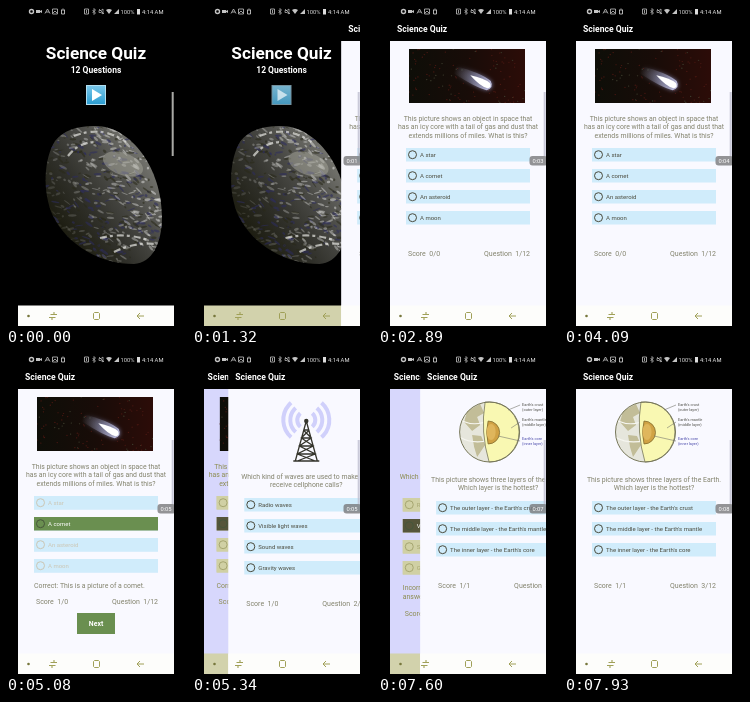
Recreate the animation shown at these times as an HTML page with a canvas. Size 180x320 px, loop 8 s.

```html
<!DOCTYPE html>
<html lang="en">
<head>
<meta charset="utf-8">
<title>Science Quiz</title>
<style>
html, body { margin: 0; width: 100%; height: 100%; overflow: hidden; background: #000; }
canvas { display: block; width: 180px; height: 320px; }
</style>
</head>
<body>
<canvas id="stage"></canvas>
<script>
const LOOP = 8000, LEFT = 12, WIDTH = 156, SLIDE = 500;
const SLIDE_STARTS = [1300, 5110, 7390];
const TICKS = [950, 1970, 2890, 3950, 4900, 5990, 6990, 7930];
const LIGHT = { bg: '#f9f9ff', box: '#d0ecfb', text: '#82826c', option: '#4a4a3c', faded: '#cbc6b4', pick: '#6a8f50', nav: '#fdfdfb' };
const DIM = { bg: '#d7d7fc', box: '#d0d0a4', text: '#8c8c50', option: '#77773f', faded: '#a6a670', pick: '#55553a', nav: '#d2d2ac' };

const QUESTIONS = [
  { art: drawComet, textY: 115, top: 142, pick: 1, pickAt: 4130, score: ['0/0', '1/0'],
    text: ['This picture shows an object in space that', 'has an icy core with a tail of gas and dust that', 'extends millions of miles. What is this?'],
    options: ['A star', 'A comet', 'An asteroid', 'A moon'],
    note: ['Correct: This is a picture of a comet.'] },
  { art: drawTower, textY: 125, top: 144, pick: 1, pickAt: 6570, score: ['1/0', '1/1'],
    text: ['Which kind of waves are used to make and', 'receive cellphone calls?'],
    options: ['Radio waves', 'Visible light waves', 'Sound waves', 'Gravity waves'],
    note: ['Incorrect: Radio waves is the correct', 'answer.'] },
  { art: drawLayers, textY: 128, top: 147, pick: -1, pickAt: Infinity, score: ['1/1'],
    text: ['This picture shows three layers of the Earth.', 'Which layer is the hottest?'],
    options: ["The outer layer - the Earth's crust", "The middle layer - the Earth's mantle", "The inner layer - the Earth's core"] }
];

const canvas = document.getElementById('stage');
const g = canvas.getContext('2d');
const dpr = window.devicePixelRatio || 1;
canvas.width = 180 * dpr;
canvas.height = 320 * dpr;

const clamp = v => Math.max(0, Math.min(1, v));

function seeded(seed) {
  return () => (seed = (seed * 16807) % 2147483647) / 2147483647;
}

function rect(x, y, w, h, color) {
  g.fillStyle = color;
  g.fillRect(x, y, w, h);
}

function label(text, x, y, size, color, align = 'left', weight = 400) {
  g.font = `${weight} ${size}px Roboto, sans-serif`;
  g.textAlign = align;
  g.fillStyle = color;
  g.fillText(text, x, y);
}

function ellipse(x, y, rx, ry, color, angle = 0) {
  g.beginPath();
  g.ellipse(x, y, rx, ry, angle, 0, 7);
  g.fillStyle = color;
  g.fill();
}

function ring(x, y, r, color, width = 1, from = 0, to = 7) {
  g.beginPath();
  g.arc(x, y, r, from, to);
  g.strokeStyle = color;
  g.lineWidth = width;
  g.stroke();
}

function shape(d, fill, stroke, width = 1) {
  const path = new Path2D(d);
  if (fill) { g.fillStyle = fill; g.fill(path); }
  if (stroke) { g.strokeStyle = stroke; g.lineWidth = width; g.stroke(path); }
}

function clipped(d, draw) {
  g.save();
  g.clip(new Path2D(d));
  draw();
  g.restore();
}

function gradient(x0, y0, x1, y1, ...colors) {
  const fill = g.createLinearGradient(x0, y0, x1, y1);
  colors.forEach((color, i) => fill.addColorStop(i / (colors.length - 1), color));
  return fill;
}

function drawEarth() {
  clipped('M88 120C125 119 156 163 156 210C156 238 146 257 128 258C95 258 62 240 47 210C36 186 38 152 49 135C57 125 70 120 88 120Z', () => {
    rect(38, 118, 120, 142, gradient(48, 215, 140, 150, '#1c1c10', '#30302a', '#4c4c48', '#74746e'));
    const rand = seeded(71);
    for (let i = 0; i < 620; i++) {
      const x = 38 + rand() * 120, y = 120 + rand() * 138;
      const lit = clamp((x - 38) / 118 - (y - 185) / 260);
      const kind = rand();
      const color = kind < .25 ? '44,44,96' : kind < .5 ? '40,40,24' : '216,216,214';
      const alpha = kind < .5 ? .55 : .1 + lit * .5;
      ellipse(x, y, 1 + rand() * 3.4, .5 + rand() * .9, `rgba(${color},${alpha})`, rand() * 1.4 - .4);
    }
    ellipse(117, 158, 21, 11, 'rgba(160,160,150,.55)', .35);
    g.setLineDash([7, 3, 3, 4]);
    shape('M68 130Q96 119 120 136M94 232Q118 226 142 234M108 246Q128 236 150 238M62 150Q72 137 88 136', null, 'rgba(230,230,226,.7)', 2.2);
    g.setLineDash([]);
  });
}

function drawTitle(t, colors) {
  rect(LEFT, 0, WIDTH, 300, '#000');
  label('Science Quiz', 90, 53, 17.2, '#fff', 'center', 700);
  label('12 Questions', 90, 67, 8.5, '#fff', 'center', 700);
  g.globalAlpha = t > 1240 ? .65 : 1;
  rect(80, 79, 20, 20, '#b2def0');
  rect(81, 80, 18, 18, gradient(0, 79, 0, 99, '#7cc8ea', '#289bd0'));
  shape('M86 83L96 89L86 95Z', '#fff');
  g.globalAlpha = 1;
  drawEarth();
  drawNavBar(colors);
}

function drawComet() {
  clipped('M31 43H147V97H31Z', () => {
    rect(31, 43, 116, 54, gradient(31, 0, 147, 0, '#0e0e08', '#180c08', '#2c0c08'));
    const rand = seeded(19);
    for (let i = 0; i < 110; i++) {
      ellipse(31 + rand() * 116, 43 + rand() * 54, .7, .6, rand() < .8 ? '#4a1812' : '#3c3c2c');
    }
    g.save();
    g.translate(107, 78);
    g.rotate(.42);
    g.shadowColor = '#707090';
    g.shadowBlur = 4 * dpr;
    shape('M-36 -4Q-8 -9 4 -5Q10 0 4 5Q-8 7 -32 3Z', gradient(-34, 0, 6, 0, 'rgba(80,80,80,0)', 'rgba(125,125,150,.6)', '#dcdcff'));
    shape('M-17 -2Q-4 -5 4 -3Q8 0 4 3Q-4 4 -17 -2Z', '#fff');
    g.restore();
  });
}

function drawTower() {
  for (const r of [9, 16, 23]) {
    ring(90, 66, r, '#d0d0fb', 4, -.85, .85);
    ring(90, 66, r, '#d0d0fb', 4, Math.PI - .85, Math.PI + .85);
  }
  shape('M90 67L79 107M90 67L101 107M87 76H93M85 84H95M83 92H97M81 100H99M87 76L95 84L83 92L99 100L81 107M93 76L85 84L97 92L81 100L99 107M77 107H103', null, '#35352c', 1.3);
  ellipse(90, 67, 2.2, 2.2, '#35352c');
}

function drawLayers() {
  ellipse(81.5, 78, 30, 30, '#e6e6dc');
  clipped('M81 48A30 30 0 0 0 81 108Z', () => {
    shape('M59 57L72 50L76 59L69 63L72 71L64 77L56 68Z M64 81L73 82L77 91L69 103L66 93Z', '#c2bd98');
    shape('M54 67Q68 73 81 66M51 83Q66 91 81 86', null, '#f6f6f0', 1.2);
  });
  shape('M77 48Q72 78 81 108A30 30 0 0 0 81 48Z', '#f9f8b2', '#77775a', .8);
  ring(81.5, 78, 30, '#77775a', 1);
  shape('M80 67A11.5 11.5 0 0 1 80 90Q77 78 80 67Z', '#d0a244', '#77652c', .7);
  ellipse(83, 78, 4.5, 8, '#dfb65c');
  shape('M100 56L112 51M103 74L112 68M90 82L112 87', null, '#77776f', .6);
  [['crust', 'outer', 52], ['mantle', 'middle', 67], ['core', 'inner', 86]].forEach(([part, place, y], i) => {
    const color = i === 2 ? '#4444a8' : '#4b4b45';
    label(`Earth's ${part}`, 114, y, 3.9, color);
    label(`(${place} layer)`, 114, y + 5, 3.9, color);
  });
}

function drawOption(text, y, colors, picked, faded) {
  const ink = faded ? colors.faded : colors.option;
  rect(28, y, 124, 13.5, picked ? colors.pick : colors.box);
  ring(34.5, y + 6.7, 4, picked ? '#46563a' : ink);
  label(text, 42, y + 9, 6, picked ? '#fff' : ink);
}

function drawQuestion(number, t, colors) {
  const q = QUESTIONS[number - 1];
  const answered = clamp((t - q.pickAt) / 200);
  const end = q.top + 13 + (q.options.length - 1) * 21;
  const scoreY = end + 32 + (answered ? (q.note.length - 1) * 10 : 0);
  rect(LEFT, 10, WIDTH, 25, '#000');
  label('Science Quiz', 19, 26, 8.6, '#fff', 'left', 700);
  rect(LEFT, 35, WIDTH, 285, colors.bg);
  q.art();
  q.text.forEach((line, i) => label(line, 90, q.textY + i * 8.4, 6.9, colors.text, 'center'));
  q.options.forEach((text, i) => drawOption(text, q.top + i * 21, colors));
  if (answered) {
    g.globalAlpha = answered;
    q.options.forEach((text, i) => drawOption(text, q.top + i * 21, colors, i === q.pick, true));
    q.note.forEach((line, i) => label(line, 28, end + 16 + i * 8.5, 6.9, colors.text));
    rect(71, scoreY + 9, 38, 21, colors.pick);
    label('Next', 90, scoreY + 22, 6.9, '#fff', 'center', 700);
    g.globalAlpha = 1;
  }
  label(`Score  ${q.score[answered ? 1 : 0]}`, 30, scoreY, 7, colors.text);
  label(`Question  ${number}/12`, 106, scoreY, 7, colors.text);
  drawNavBar(colors);
}

function drawNavBar({ nav }) {
  rect(LEFT, 299.5, WIDTH, 20.5, nav);
}

function drawNavIcons() {
  const olive = '#a0a058';
  ellipse(22.5, 310, 1.3, 1.3, '#77773c');
  shape('M43 311.5H49.5M46 311.5V314M51 308.5H44.5M48 308.5V306', null, olive, 1.1);
  shape('M88.5 306.5H92.5L93.5 307.5V312.5L92.5 313.5H88.5L87.5 312.5V307.5Z', null, olive);
  shape('M138 310H131M134 307L131 310L134 313', null, olive);
}

function drawStatus() {
  rect(0, 0, 180, 10, '#000');
  const gray = '#c4c4c4';
  ring(25.5, 5.5, 2, gray, 1.4);
  shape('M30 4H34V7H30ZM34 5L36 4V7L34 6', gray);
  shape('M39 7.5L41.5 3L44 7.5M40 6H43', null, gray, .8);
  shape('M46.5 3H51.5V8H46.5ZM47 7L49 5L51 7', null, gray, .8);
  shape('M55 4H59M55.5 4V8H58.5V4M56.5 3H57.5', null, gray, .9);
  shape('M78.5 3H82.5V8H78.5ZM80.5 4V7', null, gray, .8);
  shape('M86.5 4L89.5 7L88 8.5V2.5L89.5 4L86.5 7', null, gray, .7);
  shape('M93 4.5H95L97 3V8L95 6.5H93ZM93 3L98 8', null, gray, .7);
  shape('M100 4Q103 2 106 4L103 8Z M108 8H113V3Z', gray);
  label('100%', 114.5, 8, 5.8, '#ddd');
  rect(131, 3, 3, 5.5, '#ddd');
  label('4:14 AM', 136, 8, 5.8, '#eee');
}

function drawOverlay(t) {
  rect(165.7, 86, 2, 64, t < SLIDE_STARTS[0] ? '#a9a9a5' : 'rgba(190,190,208,.8)');
  if (t < 70) return;
  const seconds = TICKS.filter(tick => t >= tick).length;
  g.beginPath();
  g.roundRect(151.5, 150, 18, 9.5, 3);
  g.fillStyle = 'rgba(118,118,120,.78)';
  g.fill();
  label(`0:0${seconds}`, 160, 157, 5.8, '#fff', 'center');
}

function drawPage(index, t, x, colors) {
  g.save();
  g.translate(x, 0);
  if (index) drawQuestion(index, t, colors);
  else drawTitle(t, colors);
  g.restore();
}

function render(t) {
  g.setTransform(dpr, 0, 0, dpr, 0, 0);
  rect(0, 0, 180, 320, '#000');
  const page = SLIDE_STARTS.filter(start => t >= start).length;
  const left = page ? (1 - clamp((t - SLIDE_STARTS[page - 1]) / SLIDE)) ** 3 : 0;
  clipped('M12 0H168V320H12Z', () => {
    if (left) drawPage(page - 1, t, -4 * (1 - left), DIM);
    drawPage(page, t, WIDTH * left, LIGHT);
    drawNavIcons();
    drawStatus();
    drawOverlay(t);
  });
}

function loop() {
  render(performance.now() % LOOP);
  requestAnimationFrame(loop);
}
loop();
</script>
</body>
</html>
```
